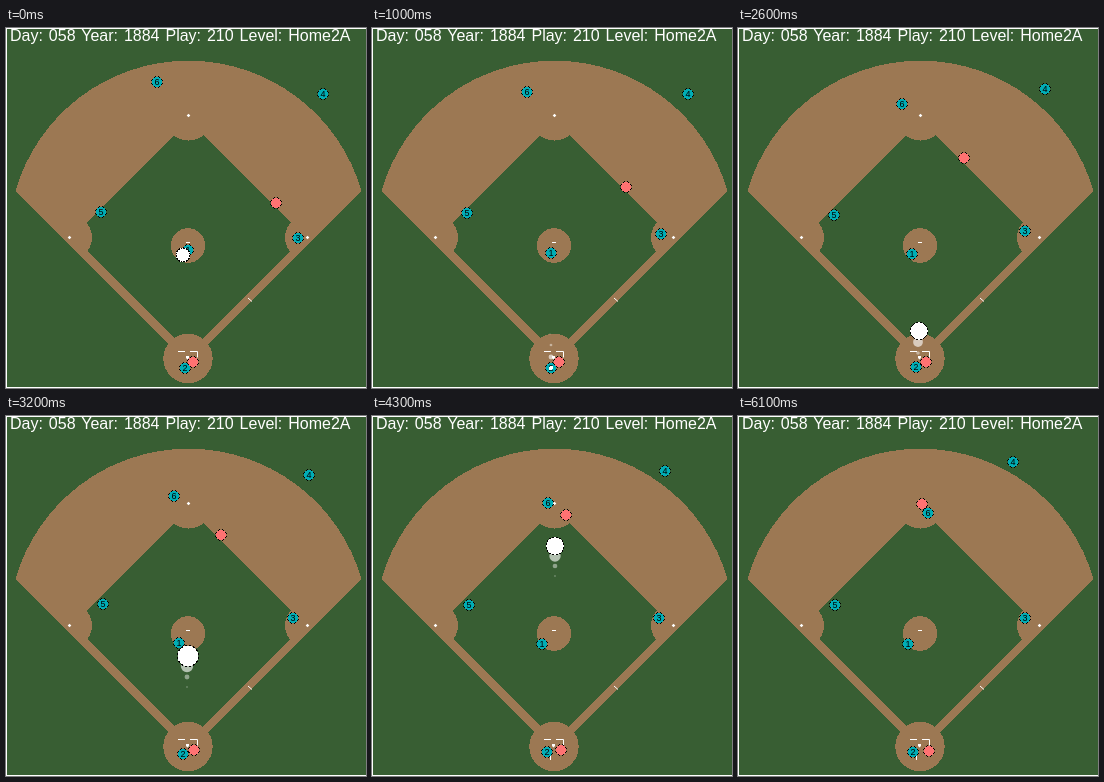
Recreate the animation shown at these times as an HTML page. Size 360x360 px, loop 6.2 s.

```html
<!DOCTYPE html>
<html lang="en">
<head>
<meta charset="utf-8">
<title>Baseball play</title>
<style>
  html, body { margin: 0; width: 100%; height: 100%; overflow: hidden; background: #fff; }
  svg { display: block; width: 100vw; height: 100vh; }
  text { font-family: "Liberation Sans", Arial, sans-serif; }
  .title { font-size: 16px; word-spacing: 1.5px; fill: #fff; }
  .num { font-size: 9px; text-anchor: middle; }
  .field { shape-rendering: crispEdges; }
  .ring { stroke: #000; stroke-dasharray: 1.2 0.8; stroke-dashoffset: 1.6; shape-rendering: crispEdges; }
</style>
</head>
<body>
<svg viewBox="0 0 360 360">
  <g class="field" fill="#9c7853">
    <rect x="1" y="1" width="359" height="358" fill="#385e33"/>
    <path d="M9.500 163A180 180 0 0 1 355.500 163L182.500 336Z"/>
    <path d="M182.500 92.500l116 116l-116 116l-116-116z" fill="#385e33"/>
    <circle cx="182.500" cy="87.500" r="25"/>
    <circle cx="63.500" cy="209.500" r="22.500"/>
    <circle cx="301.500" cy="209.500" r="22.500"/>
    <circle cx="182" cy="217.500" r="17.300"/>
    <circle cx="182" cy="330.500" r="24.700"/>
    <!-- grass outside the foul lines -->
    <path d="M9.500 163l153 153L120 330L1 250V163Z M355.500 163l-153 153L244 330L360 250V163Z" fill="#385e33"/>
  </g>
  <g fill="#fff">
    <path id="base" d="M182.500 85.700l1.800 1.800l-1.800 1.800l-1.800-1.800z"/>
    <use href="#base" x="-119" y="122"/>
    <use href="#base" x="119" y="122"/>
    <path d="M180 214h4v1h-4z M180 328h3v2l-1.500 1.500l-1.500-1.500z"/>
  </g>
  <path d="M172 323.500h7M184 323.500h7.500v6M178.500 339v5M242 270l4 3.500" fill="none" stroke="#fff"/>
  <text class="title" x="4" y="13">Day: 058 Year: 1884 Play: 210 Level: Home2A</text>
  <g id="men"></g>
  <g id="ball"></g>
</svg>
<script>
const LOOP = 6200, STEP = 100;
const CYAN = '#00adb5', RED = '#ff7272';

// a move runs during [start, end]; pow eases x and y separately
const move = (from, to, during, pow = [1, 1]) => ({ from, to, during, pow });

const catcher = move([179, 340], [175, 336], [1800, 4300]);
const men = [
  { num: 1, path: move([182, 222], [170, 228], [0, 4300], [0.9, 0.6]) },
  { num: 2, path: catcher },
  { num: 3, path: move([292, 210], [287, 202], [0, 3200], [0.35, 0.6]) },
  { num: 4, path: move([317, 66], [275, 46], [700, 6100], [1.4, 1.4]) },
  { num: 5, path: move([95, 184], [97, 189], [0, 4200]) },
  { num: 6, path: move([151, 54], [190, 97], [0, 6100], [1.25, 0.8]) },
  { path: move([187, 334], [191, 335], [1500, 6100], [1, 3]) },
  { path: move([270, 175], [184, 88], [0, 4850], [1.07, 1.07]) }
];

// radius stands for height: 7 + rise*u - drop*u*u
const pitch = { path: move([177, 227], [179, 340], [0, 1000]), rise: 11.7, drop: 16.7 };
const toss = { path: move([180, 337], [184, 91], [2300, 4700], [1, 0.95]), rise: 15, drop: 15 };

const progress = ({ during: [start, end] }, t) => Math.min(1, Math.max(0, (t - start) / (end - start)));

function at(path, t) {
  const u = progress(path, t);
  return path.from.map((a, i) => Math.round(a + (path.to[i] - a) * u ** path.pow[i]));
}

function ballAt({ path, rise, drop }, t) {
  if (t < path.during[0] || t > path.during[1]) return null;
  const u = progress(path, t);
  return [...at(path, t), 7 + rise * u - drop * u * u];
}

function add(parent, tag, attrs) {
  const el = document.createElementNS('http://www.w3.org/2000/svg', tag);
  for (const k in attrs) el.setAttribute(k, attrs[k]);
  return parent.appendChild(el);
}

function place(el, [x, y, r]) {
  el.setAttribute('cx', x);
  el.setAttribute('cy', y);
  el.setAttribute('r', r);
}

const menLayer = document.getElementById('men');
for (const m of men) {
  m.el = add(menLayer, 'g', {});
  add(m.el, 'circle', { class: 'ring', r: 5.5, pathLength: 16, fill: m.num ? CYAN : RED });
  if (m.num) add(m.el, 'text', { class: 'num', y: 3 }).textContent = m.num;
}

const ballLayer = document.getElementById('ball');
const trail = [0, 1, 2].map(i => add(ballLayer, 'circle', { fill: '#fff', 'fill-opacity': 0.62 - 0.18 * i }));
const ball = add(ballLayer, 'circle', { class: 'ring', pathLength: 32, fill: '#fff' });
const NONE = [0, 0, 0];

function draw(t) {
  for (const m of men) m.el.setAttribute('transform', `translate(${at(m.path, t)})`);

  const flight = t < 2300 ? pitch : toss;
  const held = t > 1000 && t < 2300;
  const now = ballAt(flight, t);
  ball.setAttribute('stroke-opacity', held ? 0 : 1);
  place(ball, now || (held ? [...at(catcher, t), 2] : NONE));

  trail.forEach((dot, i) => {
    const past = now && ballAt(flight, t - (i + 1) * STEP);
    place(dot, past ? [past[0], past[1], past[2] * 0.6 * 0.4 ** i] : NONE);
  });
}

function tick() {
  const t = performance.now() % LOOP;
  draw(Math.floor(t / STEP) * STEP);
  requestAnimationFrame(tick);
}
tick();
</script>
</body>
</html>
```
